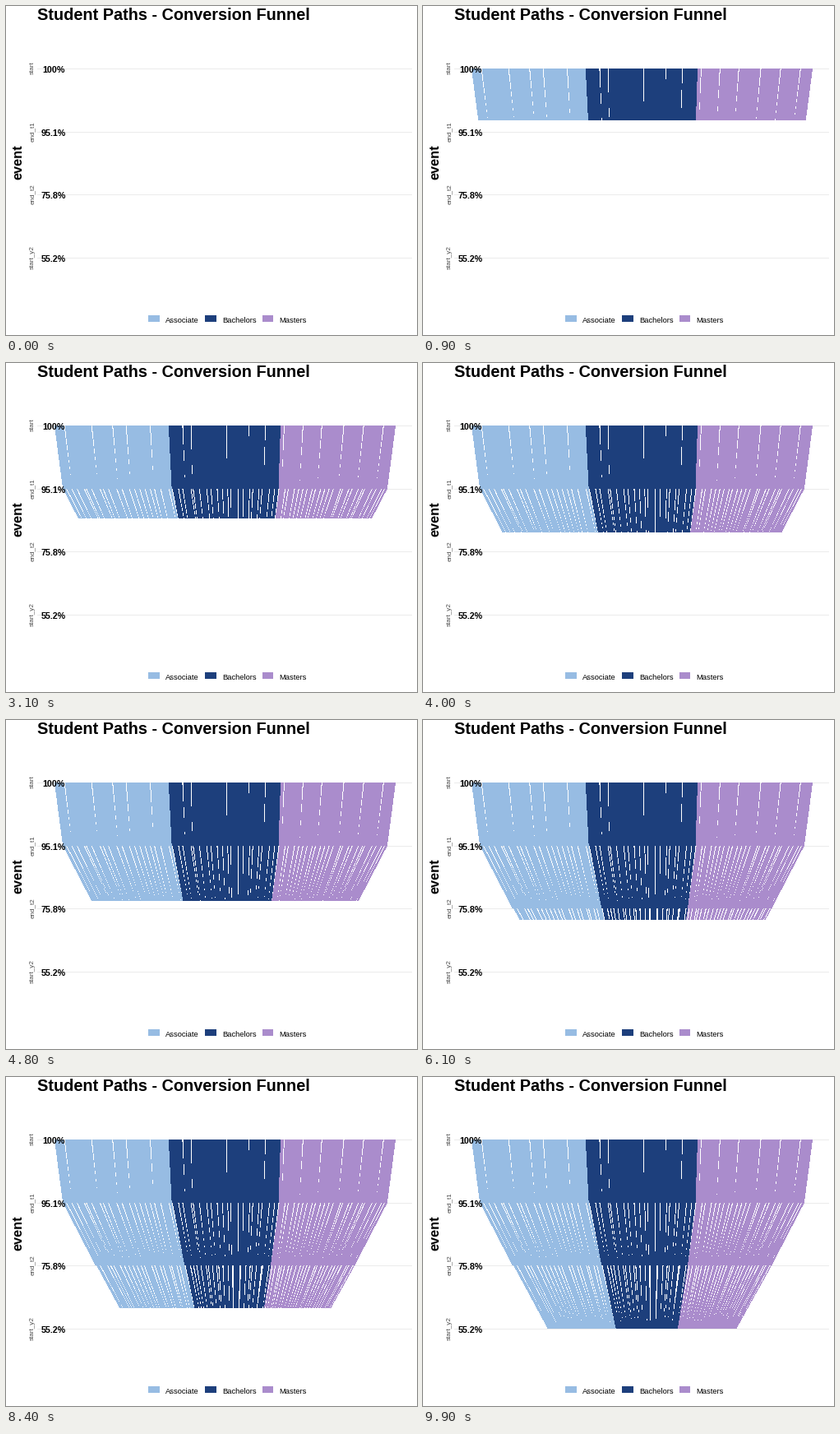
Recreate the animation shown at these times as a matplotlib script. Size 500x400 px, loop 10 s.

```python
import numpy as np
import matplotlib.pyplot as plt
from matplotlib.animation import FuncAnimation
from matplotlib.colors import to_rgba
from matplotlib.patches import Rectangle

W, H, DPI = 500, 400, 100
PX = 72 / DPI  # points per pixel
FRAMES, INTERVAL = 100, 100

LEVELS = [76, 153, 229.9, 306.4]
KNOTS = [0, 11, 53, 99]  # frames at which the front reaches each level
EVENTS = ["start", "end_t1", "end_t2", "start_y2"]
GROUPS = ["Associate", "Bachelors", "Masters"]
COLORS = ["#97BCE3", "#1D3F7C", "#AA8CCC"]
COUNTS = np.array([[109, 107, 110],  # students per group at each event
                   [104, 102, 104],
                   [85, 82, 80],
                   [65, 59, 56]])
TOTALS = COUNTS.sum(axis=1)
CENTER, STEP, STROKE = 266.5, 415 / TOTALS[0], 1.4
rng = np.random.default_rng(7)


def pack(n):
    """Centres of n students standing side by side."""
    return CENTER + (np.arange(n) + 0.5 - n / 2) * STEP


def stayers(n, n_next):
    """Mask of those who go on; the leavers are spread with some jitter."""
    gone = n - n_next
    keep = np.ones(n, bool)
    keep[((np.arange(gone) + 0.7 * rng.random(gone)) * n / gone).astype(int)] = False
    return keep


def paint_funnel():
    """Hard-edged strokes, one per student, from each event to the next."""
    canvas = np.zeros((H, W, 4))
    rgba = np.array([to_rgba(c) for c in COLORS])
    for s in range(len(LEVELS) - 1):
        keep = np.concatenate([stayers(*pair) for pair in zip(COUNTS[s], COUNTS[s + 1])])
        x0, x1 = pack(TOTALS[s])[keep], pack(TOTALS[s + 1])
        colors = np.repeat(rgba, COUNTS[s + 1], axis=0)
        top, bottom = LEVELS[s:s + 2]
        for row in range(int(top), int(bottom)):
            t = (row + 0.5 - top) / (bottom - top)
            x = x0 + (x1 - x0) * t - 0.5
            canvas[row, np.ceil(x - STROKE / 2).astype(int)] = colors
            canvas[row, np.floor(x + STROKE / 2).astype(int)] = colors
    return canvas


fig = plt.figure(figsize=(W / DPI, H / DPI), dpi=DPI, facecolor="white")
ax = fig.add_axes([0, 0, 1, 1])
ax.axis("off")


def label(x, y, text, size, **kw):
    opts = dict(family="Liberation Sans", va="baseline", color="black", zorder=5)
    ax.text(x, y, text, fontsize=size * PX, **{**opts, **kw})


def side_label(x, y, text, size, **kw):
    label(x, y, text, size, rotation=90, rotation_mode="anchor", ha="center", **kw)


def box(x, y, w, h, color):
    ax.add_patch(Rectangle((x, y), w, h, fc=color, ec="none", lw=0))


label(38, 17, "Student Paths - Conversion Funnel", 19.9, weight="bold")
side_label(19, 190, "event", 16.4, weight="bold")

for i, event in enumerate(EVENTS):
    row = int(76.3 + 76.8 * i)
    box(38, row, 456, 1, "#EBEBEB")
    side_label(33.5, row - 0.6, event, 8.15, color="#4D4D4D")
    label(58, row + 5, f"{100 * TOTALS[i] / TOTALS[0]:.3g}%", 10.7,
          weight="bold", ha="center")

for i, (name, color) in enumerate(zip(GROUPS, COLORS)):
    x = 173 + 69.4 * i
    box(x, 376, 13.6, 8, color)
    label(x + 20.6, 385, name, 9.4)

funnel = paint_funnel()
picture = ax.imshow(np.zeros_like(funnel), extent=(0, W, H, 0), aspect="auto",
                    interpolation="nearest", zorder=3)
ax.set(xlim=(0, W), ylim=(H, 0))


def update(i):
    shown = funnel.copy()
    shown[int(np.interp(i, KNOTS, LEVELS)):] = 0
    picture.set_data(shown)
    return [picture]


anim = FuncAnimation(fig, update, frames=FRAMES, interval=INTERVAL,
                     repeat=True, repeat_delay=0, blit=False)
plt.show()
```
